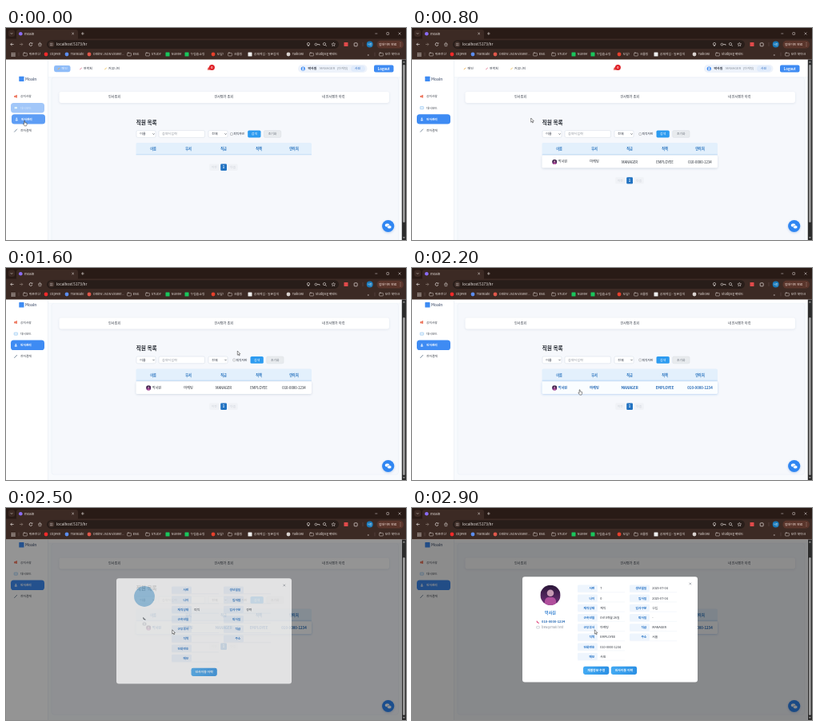
Write an HTML page with a canvas that moves like this. It is 500 px wide and 266 px high and loops after 3 s.

```html
<!DOCTYPE html>
<html lang="ko">
<head>
<meta charset="utf-8">
<title>MoaIn</title>
<style>
html, body { margin: 0; width: 100%; height: 100%; overflow: hidden; background: #fff; }
canvas { display: block; width: 500px; height: 266px; }
</style>
</head>
<body>
<canvas id="stage"></canvas>
<script>
const W = 500, H = 266, LOOP = 3000, STEP = 100, TOP = 39.5;
const canvas = document.getElementById('stage');
const ctx = canvas.getContext('2d');
const dpr = window.devicePixelRatio || 1;
canvas.width = W * dpr;
canvas.height = H * dpr;

const FONT = '"Noto Sans CJK KR", "Noto Sans CJK", "Noto Sans", sans-serif';
const BLUE = '#3e8bf3', INK = '#2d3440', GRAY = '#8b929c', DEEP = '#2468b4';
const PERSON = '박사원', PHONE = '010-0000-1234';

function text(s, x, y, size, color, weight = 400, align = 'left') {
  ctx.font = `${weight} ${size}px ${FONT}`;
  ctx.textAlign = align;
  ctx.fillStyle = color;
  ctx.fillText(s, x, y + size * 0.36);
}
const centered = (s, x, y, size, color, weight) => text(s, x, y, size, color, weight, 'center');

function box(x, y, w, h, r, fill, stroke, lw = 0.5) {
  ctx.beginPath();
  ctx.roundRect(x, y, w, h, r);
  if (fill) { ctx.fillStyle = fill; ctx.fill(); }
  if (stroke) { ctx.strokeStyle = stroke; ctx.lineWidth = lw; ctx.stroke(); }
}
function dot(x, y, r, fill) {
  ctx.beginPath();
  ctx.arc(x, y, r, 0, 7);
  ctx.fillStyle = fill;
  ctx.fill();
}
function ring(x, y, r, color, lw = 0.6, from = 0, to = 7) {
  ctx.beginPath();
  ctx.arc(x, y, r, from, to);
  ctx.strokeStyle = color;
  ctx.lineWidth = lw;
  ctx.stroke();
}
function line(color, lw, ...p) {
  ctx.beginPath();
  for (let i = 0; i < p.length; i += 2) ctx.lineTo(p[i], p[i + 1]);
  ctx.strokeStyle = color;
  ctx.lineWidth = lw;
  ctx.stroke();
}
function cross(x, y, r, color, lw = 0.6) {
  line(color, lw, x - r, y - r, x + r, y + r);
  line(color, lw, x - r, y + r, x + r, y - r);
}
function shadow(color, blur, dy) {
  ctx.shadowColor = color;
  ctx.shadowBlur = blur * dpr;
  ctx.shadowOffsetY = dy * dpr;
}
const noShadow = () => shadow('transparent', 0, 0);

function faded(alpha, draw) {
  ctx.save();
  ctx.globalAlpha *= alpha;
  draw();
  ctx.restore();
}

// Piecewise linear track of [time, ...values].
function track(keys, t) {
  let i = keys.findIndex(k => k[0] > t);
  if (i < 0) return keys[keys.length - 1].slice(1);
  if (i === 0) return keys[0].slice(1);
  const a = keys[i - 1], b = keys[i], u = (t - a[0]) / (b[0] - a[0]);
  return a.slice(1).map((v, n) => v + (b[n + 1] - v) * u);
}

const pointerPath = [
  [0, 22.5, 116.5], [500, 23, 117], [600, 46, 123], [700, 108, 127], [800, 148.7, 113],
  [900, 184, 107], [1000, 228, 101], [1100, 268, 102], [1200, 287, 104], [1300, 289.3, 104],
  [1800, 289.3, 104], [1900, 278, 113], [2000, 250, 134], [2100, 220, 149], [2200, 209, 152.8],
  [2300, 209, 152.8], [2400, 207.6, 152.8], [2600, 208, 152.8], [2800, 224, 152.8], [2900, 228.3, 152.8]
];
const scrollPath = [[0, 0], [1300, 0], [1400, 8], [1500, 15], [1600, 17.6]];
const modalPath = [
  // time, opacity, vertical offset, dimming
  [2400, 0.5, 4, 0.37], [2500, 0.74, 2, 0.42], [2600, 0.93, 0.7, 0.44], [2700, 1, 0, 0.45]
];

function folder(x, y) {
  box(x - 2.4, y - 1.6, 4.8, 3.6, 0.6, null, '#d9cfcb');
  line('#d9cfcb', 0.6, x - 2.2, y - 2, x - 0.2, y - 2);
}

function bookmarks() {
  const y = 33, pale = '#e2dad6';
  for (let i = 0; i < 9; i++) box(6.8 + i % 3 * 1.8, 31 + Math.floor(i / 3) * 1.8, 1.1, 1.1, 0, pale);
  line('#6a5750', 0.5, 16, 30.5, 16, 35.5);
  const items = [
    [24, '취준전산'], [50, 'ClipFen', '#f22a2a'], [76, 'Translate', '#5b8def'],
    [104, 'Online JSON Viewer...', '#e0574a'], [154, 'ENG'], [177, 'STUDY'],
    [202, 'NURIM', '#19c65c', 1], [226, '누림솔쇼핑', '#19c65c', 1], [259, '도담!', '#e6402c'],
    [280, '크롤링'], [305, '공채게임 - 일본검색', '#eeeeee', 1], [353, 'TalkOwl', '#d8d2cf'],
    [382, 'Studipeg 백엔드'], [469, '모든 북마크']
  ];
  for (const [x, label, color, square] of items) {
    if (!color) folder(x, y);
    else if (square) box(x - 2.5, y - 2.5, 5, 5, 0.5, color);
    else dot(x, y, 2.4, color);
    text(label, x + 4.8, y, 3.85, pale);
  }
  text('»', 451.5, y - 0.3, 5, pale);
  line('#6a5750', 0.5, 461, 30.5, 461, 35.5);
}

function browser() {
  const pale = '#e6dfdc';
  box(0, 0, W, TOP, 0, '#3c2a24');
  box(0, 0, W, 13.5, 0, '#291b16');
  box(3, 2.5, 8, 8.5, 2.4, '#3c2a24');
  line(pale, 0.6, 5.7, 6.2, 7, 7.5, 8.3, 6.2);
  box(13, 2, 77, 14, 3, '#3c2a24');
  dot(18.3, 7.2, 2.3, '#8a6cf5');
  text('moain', 23, 7.2, 4.2, pale);
  cross(83.6, 7, 1.2, pale);
  line(pale, 0.6, 94, 7, 97.6, 7);
  line(pale, 0.6, 95.8, 5.2, 95.8, 8.8);
  line(pale, 0.5, 461.3, 7, 464.3, 7);
  box(475.8, 5.6, 2.8, 2.8, 0.4, null, pale);
  cross(492, 7, 1.5, pale, 0.5);

  line(pale, 0.7, 9.6, 20.5, 5.8, 20.5);
  line(pale, 0.7, 7.5, 18.7, 5.8, 20.5, 7.5, 22.3);
  line('#8d7d76', 0.7, 17, 20.5, 20.8, 20.5);
  line('#8d7d76', 0.7, 19.1, 18.7, 20.8, 20.5, 19.1, 22.3);
  ring(31, 20.5, 1.9, pale, 0.7, 0.3, 5.6);
  line(pale, 0.6, 33, 18.3, 33, 19.7, 31.6, 19.7);
  line(pale, 0.6, 40.3, 20.3, 42.4, 18.3, 44.5, 20.3);
  box(41, 20, 2.8, 2.7, 0.2, null, pale);

  box(51, 15.3, 365, 10.6, 5.3, '#281d19');
  dot(56.7, 20.6, 3.5, '#46352f');
  line(pale, 0.5, 55, 19.7, 58.4, 19.7);
  line(pale, 0.5, 55, 21.6, 58.4, 21.6);
  text('localhost:5173/hr', 63, 20.6, 4.7, '#f0ebe8');
  ring(378, 20, 1.6, pale);
  line(pale, 0.6, 377, 21.3, 378, 23, 379, 21.3);
  ring(387.4, 20.6, 1.4, pale);
  line(pale, 0.7, 388.8, 20.6, 392, 20.6, 392, 21.8);
  ring(398, 20.1, 1.6, pale);
  line(pale, 0.7, 399.2, 21.3, 400.7, 22.9);
  ctx.beginPath();
  for (let i = 0; i < 10; i++) {
    const r = i % 2 ? 1.1 : 2.5, a = i * Math.PI / 5 - Math.PI / 2;
    ctx.lineTo(409.3 + r * Math.cos(a), 20.7 + r * Math.sin(a));
  }
  ctx.closePath();
  ctx.strokeStyle = pale;
  ctx.lineWidth = 0.5;
  ctx.stroke();
  box(422.5, 18, 5, 5, 0.6, '#e04a4a');
  box(435.2, 18.8, 4, 4, 0.7, null, pale, 0.7);
  line('#6a5750', 0.5, 446, 18, 446, 23);
  dot(454.7, 20.6, 4, '#1677b8');
  centered('사원', 454.7, 20.6, 3, '#fff');
  box(463.5, 15.8, 33.5, 9.8, 4.9, '#5a352b');
  text('업데이트 완료', 466, 20.6, 3.9, '#f6e4de');
  for (const y of [18.7, 20.6, 22.5]) dot(493, y, 0.45, '#f6e4de');
  bookmarks();
}

function scrollbar(scroll) {
  box(494.8, TOP, 5.2, H - TOP, 0, '#2c2c2c');
  box(496.1, 46 + scroll * 0.91, 2.6, 198, 1.3, '#9f9f9f');
  const arrow = (y, d) => {
    ctx.beginPath();
    ctx.moveTo(495.9, y);
    ctx.lineTo(498.9, y);
    ctx.lineTo(497.4, y + d);
    ctx.fillStyle = '#9f9f9f';
    ctx.fill();
  };
  arrow(43.6, -2);
  arrow(262.2, 2);
}

function sidebar(t) {
  box(0, 0, 52.5, 300, 0, '#fff');
  line('#e6ebf2', 0.6, 52.5, 39, 52.5, 300);
  box(16.3, 60.7, 6.2, 6.4, 0.6, BLUE);
  text('MoaIn', 24, 64, 5, '#27395a', 500);

  const fade = track([[0, 0.48], [100, 0.2], [200, 0]], t)[0];
  const nudge = t < 600 ? 1 : 0;
  if (fade) faded(fade, () => box(6, 94, 42, 12.4, 3.6, BLUE));
  faded(t ? 1 : 0.84, () => box(6 + nudge, 108.2, 42, 12.4, 3.6, BLUE));
  const icons = ['#ee7f68', '#7fb8ea', '#cfe4ff', '#6f8397'];
  ['공지사항', '대시보드', '인사관리', '전자결재'].forEach((label, i) => {
    const y = 86 + i * 14.2, active = i === 2, dx = active ? nudge : 0;
    if (i === 0) {
      ctx.beginPath();
      ctx.moveTo(10, 85.2); ctx.lineTo(14, 83.7); ctx.lineTo(14, 87.7); ctx.lineTo(10, 86.8);
      ctx.fillStyle = icons[0];
      ctx.fill();
    } else if (i === 1) box(10.2, y - 1.6, 4.2, 3.2, 0.4, '#e4f1fd', icons[1]);
    else if (i === 2) { dot(12.3 + dx, y - 0.9, 1, icons[2]); box(10.7 + dx, y + 0.3, 3.2, 1.7, 0.8, icons[2]); }
    else line(icons[3], 0.9, 10.3, y + 1.9, 13.9, y - 1.9);
    const color = active ? '#fff' : i === 1 && t === 0 ? '#d6e8fc' : '#3d434d';
    text(label, 18 + dx, y, 3.75, color, active ? 700 : 400);
  });
}

function header(t) {
  box(52.8, 39, 442, 22.8, 0, '#fff');
  line('#e9eef4', 0.5, 52.8, 61.8, 495, 61.8);
  const fade = track([[0, 0.58], [100, 0.25], [200, 0]], t)[0];
  if (fade) faded(fade, () => box(60, 47, 20.5, 8.2, 2.4, BLUE));
  const nav = [[66, '메인', '#f0b04c'], [93.5, '연락처', '#e0708c'], [124.5, '커뮤니티', '#f0c04c']];
  nav.forEach(([x, label, color], i) => {
    line(color, 0.9, x - 1.2, 52, x + 1.2, 50);
    text(label, x + 3.6, 51, 3.85, i === 0 && t === 0 ? '#eef5ff' : INK, 500);
  });
  dot(253.7, 50.8, 1.5, '#e0453f');
  line('#e0453f', 0.8, 251.7, 52.2, 255.7, 52.2);
  dot(257.4, 49.4, 3.5, '#e01f26');
  centered('0', 257.4, 49.4, 3.8, '#fff', 700);

  box(365, 46, 86.5, 10, 5, '#eef3fb');
  dot(371.3, 51, 2.6, BLUE);
  dot(371.3, 50.2, 0.9, '#fff');
  box(369.9, 51.4, 2.8, 1.3, 0.6, '#fff');
  text(PERSON, 377.5, 51, 3.9, INK, 700);
  text('MANAGER', 392, 51, 4.1, GRAY);
  text('(마케팅)', 414, 51, 3.9, GRAY);
  box(431, 47.2, 18, 7.6, 3.8, '#e0ebfb');
  centered('사원', 439.5, 51, 3.8, '#2f6fc4', 500);
  box(460, 46.6, 24.5, 9, 2, BLUE);
  centered('Logout', 472.2, 51, 4.3, '#fff', 700);
}

function portrait(x, y, r) {
  ctx.save();
  ctx.beginPath();
  ctx.arc(x, y, r, 0, 7);
  ctx.clip();
  const g = ctx.createLinearGradient(x, y - r, x, y + r);
  g.addColorStop(0, '#2a1638');
  g.addColorStop(1, '#6f2f78');
  box(x - r, y - r, 2 * r, 2 * r, 0, g);
  dot(x, y - r * 0.2, r * 0.34, '#c79ab4');
  box(x - r * 0.56, y + r * 0.22, r * 1.12, r, r * 0.4, '#b04f9c');
  ctx.restore();
}

function filters(loaded) {
  const y = 133, dx = loaded ? 0 : -3.3, edge = '#d3dae4';
  const select = (x, label) => {
    box(x, 128.6, 24, 8.8, 1.6, '#fff', edge);
    text(label, x + 4.3, y, 3.9, INK);
    line(INK, 0.6, x + 20.4, y - 0.6, x + 21.5, y + 0.6, x + 22.6, y - 0.6);
  };
  select(163, '이름');
  box(191, 128.6, 57.5, 8.8, 1.6, '#fff', edge);
  text('검색어 입력', 195, y, 3.9, '#858b94');
  select(253, '전체');
  box(283.8 + dx, 131.6, 2.9, 2.9, 0.5, '#fff', '#8a8f97');
  text('퇴직자만', 287.7 + dx, y, 3.7, INK);
  box(305.5 + dx, 128.6, 16.3, 8.8, 1.6, '#2c9bf0');
  centered('검색', 313.7 + dx, y, 3.9, '#fff', 500);
  box(325.7 + dx, 128.6, 21.3, 8.8, 1.6, '#e8ebee', '#d9dde2');
  centered('초기화', 336.3 + dx, y, 3.9, '#747b85');
}

function staffTable(loaded, hover) {
  const columns = [184, 228, 272, 316, 360];
  box(162.5, 144, 219.5, 15, 1.6, '#e3f0fc');
  line('#b9d9f6', 0.8, 162.5, 158.8, 382, 158.8);
  ['이름', '부서', '직급', '직책', '연락처'].forEach((s, i) => centered(s, columns[i], 151.6, 4.2, '#2470bd', 700));
  if (loaded) {
    shadow(hover ? 'rgba(50,130,220,.32)' : 'rgba(60,90,130,.2)', 3, 0.8);
    box(162.5, 160, 219.5, 15.6, 1.6, hover ? '#fafdff' : '#fff');
    noShadow();
    portrait(178.2, 168, 3.1);
    const color = hover ? '#2368b5' : '#252b34', weight = hover ? 700 : 500;
    text(PERSON, 183, 168, 4, color, weight);
    ['마케팅', 'MANAGER', 'EMPLOYEE', PHONE].forEach((s, i) =>
      centered(s, columns[i + 1], 168, i ? 4.35 : 4.1, color, weight));
  }
  const y = loaded ? 191.4 : 174.8;
  for (const [x, s] of [[260.3, '이전'], [283.7, '다음']]) {
    box(x - 6, y - 4.2, 12, 8.4, 1.4, '#f0f2f6');
    centered(s, x, y, 3.7, '#c9ced6');
  }
  box(268.2, y - 4.2, 7.8, 8.4, 1.3, '#2273c2');
  centered('1', 272.1, y, 4.2, '#fff', 700);
}

function page(t, scroll, pointer) {
  const loaded = t >= 100, hover = t >= 2100;
  box(0, 0, W, H, 0, '#f8fafd');
  ctx.save();
  ctx.translate(0, -scroll);
  box(57, 61.8, 433.5, 215, 3, '#f6f8fc', '#e6ecf4');
  header(t);
  sidebar(t);
  shadow('rgba(60,90,130,.13)', 3, 0.8);
  box(66.5, 80, 412.5, 14, 2.4, '#fff');
  noShadow();
  ['인사조회', '인사평가 조회', '내 인사평가 이력'].forEach((s, i) => centered(s, 135.5 + i * 136.8, 87, 4.1, INK, 500));
  text('직원 목록', 162.8, 118.5, 6.6, '#1d222a', 700);
  filters(loaded);
  staffTable(loaded, hover);
  ctx.restore();

  shadow('rgba(40,110,210,.3)', 3, 1);
  dot(477.7, 248.5, 7.6, '#2f86f2');
  noShadow();
  box(473.8, 245.4, 5.6, 4.2, 2.1, '#fff');
  box(476.5, 247.8, 5.4, 4, 2, '#fff', '#2f86f2', 0.6);
  scrollbar(scroll);
}

function dim(alpha) {
  ctx.save();
  ctx.beginPath();
  ctx.rect(0, TOP, 494.8, H - TOP);
  ctx.clip();
  ctx.filter = `blur(${0.5 * dpr}px)`;
  ctx.drawImage(canvas, 0, 0, W, H);
  ctx.filter = 'none';
  box(0, TOP, 494.8, H, 0, `rgba(0,0,0,${alpha})`);
  ctx.restore();
}

function fields(x, valueX, rows, filled) {
  rows.forEach(([label, value, initial], i) => {
    const y = 101 + i * 12.2;
    box(x, y - 4.6, 25, 9.2, 1.4, '#eef5fd');
    line('#eaf1f9', 0.5, x, y + 4.7, x + 59, y + 4.7);
    text(label, x + 21.3, y, 3.75, '#2673c6', 700, 'right');
    const shown = filled ? value : initial;
    if (shown) text(shown, valueX, y, 3.8, '#2c323b');
  });
}

function modalButton(x, label) {
  const g = ctx.createLinearGradient(x, 0, x + 32, 0);
  g.addColorStop(0, '#43aaf3');
  g.addColorStop(1, '#2b90e4');
  box(x, 198.8, 32.3, 10.2, 2.4, g);
  centered(label, x + 16.1, 203.9, 3.9, '#fff', 700);
}

function modalBody(filled) {
  box(138, 86.3, 219, 132.2, 3, '#fff');
  cross(347.8, 95, 1.3, '#777d86', 0.6);
  if (filled) {
    portrait(173, 109.3, 12.6);
    centered(PERSON, 173, 131.4, 5, '#2b7cd0', 700);
    line('#e0407a', 1.1, 156, 141.6, 156.6, 143.4, 158.8, 144.4);
    text(PHONE, 162, 142.8, 4.05, DEEP, 700);
    box(155.7, 148.4, 3.6, 2.6, 0.3, null, '#a5adb8');
    text('bsw@mail.test', 162, 149.7, 3.95, GRAY);
  } else {
    dot(173, 109, 12.9, '#8fc3e6');
    line('#3d4148', 1.1, 171.6, 135.4, 172.2, 137.2, 174.4, 138.2);
    box(171.2, 142.2, 3.6, 2.6, 0.3, null, '#a5adb8');
  }
  fields(207, 235.3, [
    ['사번', '7'], ['나이', '0'], ['재직상태', '재직', '퇴직'], ['근속년월', '0년 0개월 26일'],
    ['근무부서', '마케팅'], ['직책', 'EMPLOYEE'], ['전화번호', PHONE], ['메모', '사원']
  ], filled);
  fields(272, 300.3, [
    ['생년월일', '2025-07-04'], ['입사일', '2025-07-04'], ['입사구분', '신입', '경력'],
    ['퇴사일', '-'], ['직급', 'MANAGER'], ['주소', '서울']
  ], filled);
  if (filled) modalButton(214, '개별정보 수정');
  modalButton(filled ? 248.8 : 231.5, '인사이동 이력');
}

function modal(t) {
  const [alpha, dy, dark] = track(modalPath, t);
  dim(dark);
  // Composite the dialog as one layer so its parts share a single opacity.
  layerCtx.setTransform(1, 0, 0, 1, 0, 0);
  layerCtx.clearRect(0, 0, layer.width, layer.height);
  layerCtx.drawImage(t >= 2600 ? fullDialog : emptyDialog, 0, 0);
  ctx.globalAlpha = alpha;
  ctx.drawImage(layer, 0, dy, W, H);
  ctx.globalAlpha = 1;
}

function snapshot(filled) {
  const copy = document.createElement('canvas');
  copy.width = canvas.width;
  copy.height = canvas.height;
  ctx.setTransform(dpr, 0, 0, dpr, 0, 0);
  ctx.clearRect(0, 0, W, H);
  modalBody(filled);
  copy.getContext('2d').drawImage(canvas, 0, 0);
  return copy;
}
const layer = document.createElement('canvas');
layer.width = canvas.width;
layer.height = canvas.height;
const layerCtx = layer.getContext('2d');
const emptyDialog = snapshot(false), fullDialog = snapshot(true);

function cursor(x, y, hand) {
  const arrow = [0, 0, 0, 5.2, 1.2, 4.2, 2, 6, 2.8, 5.6, 2, 3.9, 3.6, 3.8];
  const palm = [0.2, 0, 1, 0, 1.2, 2.2, 3.6, 2.8, 3.5, 5, 2.9, 6.3, 0.6, 6.3, -1.1, 3.9, -0.6, 3.4, 0.1, 4];
  const shape = hand ? palm : arrow;
  ctx.beginPath();
  for (let i = 0; i < shape.length; i += 2) ctx.lineTo(x + shape[i], y + shape[i + 1]);
  ctx.closePath();
  ctx.fillStyle = '#fff';
  ctx.fill();
  ctx.strokeStyle = '#222';
  ctx.lineWidth = 0.5;
  ctx.stroke();
}

function draw(now) {
  const t = Math.floor((now % LOOP) / STEP) * STEP;
  const [x, y] = track(pointerPath, t);
  ctx.setTransform(dpr, 0, 0, dpr, 0, 0);
  page(t, track(scrollPath, t)[0]);
  if (t >= 2400) modal(t);
  browser();
  cursor(x, y, t < 600 || (t >= 2100 && t < 2400));
}

const start = performance.now();
function tick() {
  draw(performance.now() - start);
  requestAnimationFrame(tick);
}
tick();
</script>
</body>
</html>
```
